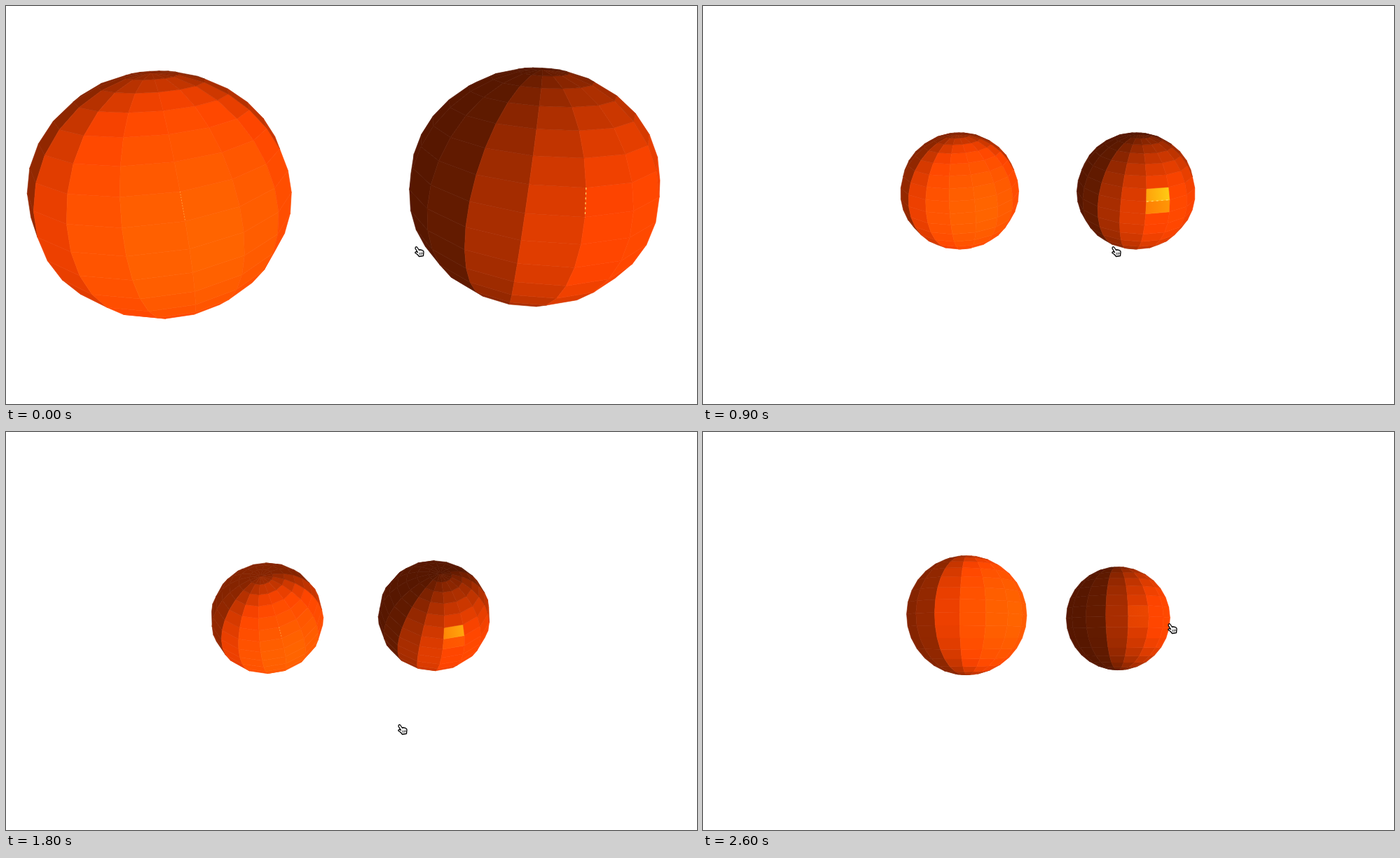
An HTML page with a canvas that plays this animation: 986 px wide and 568 px high, repeating every 2.8 s.

```html
<!DOCTYPE html>
<html lang="en">
<head>
<meta charset="utf-8">
<title>Two faceted spheres</title>
<style>
  html, body { margin: 0; width: 100%; height: 100%; overflow: hidden; background: #fff; }
  canvas { display: block; }
</style>
</head>
<body>
<canvas id="stage" width="986" height="568"></canvas>
<script>
const ctx = document.getElementById('stage').getContext('2d');
const LOOP = 2800, FOCAL = 700, CX = 492, CY = 264, SEG = 16;
const STEP = 360 / SEG, ROW = 180 / SEG;
const rad = deg => deg * Math.PI / 180;

// start ms, azimuth, pitch, distance, pointer x, pointer y
const poses = [
  [0, -3, 23, 4.15, 590, 351],
  [400, 0, 21, 4.14, 590, 351],
  [700, 0, 20.5, 4.36, 590, 351],
  [800, 0, 20.5, 6.5, 590, 351],
  [900, 0, 20.5, 8.45, 590, 351],
  [1000, 0, 20.5, 8.92, 590, 351],
  [1300, -14, 4, 8.92, 648, 306],
  [1400, -26, -13, 8.92, 703, 256],
  [1500, -23.7, -2.6, 8.92, 680, 291],
  [1600, -16, 14, 8.92, 641, 338],
  [1700, -8, 31, 8.92, 598, 388],
  [1800, -1.2, 45, 8.92, 566, 425],
  [1900, -1.2, 36, 8.92, 574, 394],
  [2000, -2, 12, 8.92, 596, 330],
  [2100, -4, -12, 8.92, 622, 262],
  [2200, -6.5, -31, 8.95, 641, 212],
  [2300, -19, -33, 8.92, 660, 196],
  [2400, -23, -10, 8.92, 678, 246],
  [2500, -25, -5, 8.92, 674, 268],
  [2600, -25.3, -2.5, 8.92, 670, 281]
];

const spheres = [
  { x: -1.5, ambient: .52, diffuse: .93, az: 24, lat: 0, shine: 1400, spread: 10 },
  { x: 1.5, ambient: .34, diffuse: .72, az: 27, lat: 3, shine: 600, spread: 22 }
];

function camera(azimuth, pitch, dist) {
  const a = rad(azimuth), p = rad(pitch);
  const sa = Math.sin(a), ca = Math.cos(a), sp = Math.sin(p), cp = Math.cos(p);
  return {
    pitch, x: dist * sa * cp, z: dist * ca * cp,
    project(x, y, z) {
      const scale = FOCAL / (dist - x * sa * cp - y * sp - z * ca * cp);
      return [
        CX + scale * (x * ca - z * sa),
        CY - scale * (y * cp - (x * sa + z * ca) * sp)
      ];
    }
  };
}

function shade(light, glow) {
  const r = light * 255 + glow, g = light * 69 + glow, b = glow * glow / 900;
  return `rgb(${[r, g, b].map(v => Math.min(255, Math.round(v)))})`;
}

const middle = (a, b) => [(a[0] + b[0]) / 2, (a[1] + b[1]) / 2];

function trace(points) {
  ctx.beginPath();
  points.forEach(p => ctx.lineTo(...p));
}

function seam(points, bold) {
  trace(points);
  ctx.strokeStyle = '#ffd96a';
  ctx.lineWidth = bold ? 1.2 : .8;
  ctx.setLineDash(bold ? [3, 4] : [1, 3]);
  ctx.stroke();
  ctx.setLineDash([]);
}

function drawSphere(s, cam) {
  const at = (lon, lat) => cam.project(
    s.x + Math.sin(rad(lon)) * Math.cos(rad(lat)),
    Math.sin(rad(lat)),
    Math.cos(rad(lon)) * Math.cos(rad(lat)));
  // direction halfway between viewer and light
  const facing = Math.atan2(cam.x - s.x, cam.z) * 180 / Math.PI;
  const halfLon = (facing + s.az) / 2, halfLat = (cam.pitch + s.lat) / 2;

  for (let lat = -90; lat < 90; lat += ROW) {
    for (let lon = -180; lon < 180; lon += STEP) {
      const quad = [at(lon, lat), at(lon + STEP, lat), at(lon + STEP, lat + ROW), at(lon, lat + ROW)];
      const [a, b, c, d] = quad;
      const area = (c[0] - a[0]) * (d[1] - b[1]) - (c[1] - a[1]) * (d[0] - b[0]);
      if (area >= 0) continue;

      const midLon = lon + STEP / 2, midLat = lat + ROW / 2;
      const facet = Math.cos(rad(midLat)) * Math.cos(rad(midLon - 30));
      const light = s.ambient + s.diffuse * Math.max(0, facet);
      const off = (midLon - halfLon) ** 2 + (midLat - halfLat) ** 2;
      const glow = s.shine * Math.exp(-off / s.spread);
      let fill = shade(light, 0);
      if (glow > 4) {
        fill = ctx.createLinearGradient(...middle(a, d), ...middle(b, c));
        fill.addColorStop(0, shade(light, glow * .8));
        fill.addColorStop(1, shade(light, glow * 1.15));
      }
      trace(quad);
      ctx.closePath();
      ctx.fillStyle = ctx.strokeStyle = fill;
      ctx.lineWidth = .6;
      ctx.fill();
      ctx.stroke();
    }
  }

  // sparkling cracks where the highlight meets a facet edge
  const lon = Math.round(halfLon / STEP) * STEP;
  const lat = Math.round(halfLat / ROW) * ROW;
  const right = s.x > 0;
  if (Math.abs(halfLon - lon) < 4.5 && lat > 0)
    seam([at(lon, lat + ROW), at(lon, lat)], right && cam.pitch > 22);
  if (right && lat > 0 && Math.abs(halfLat - lat) < 1.2)
    seam([at(0, lat), at(STEP, lat)], halfLon > 5);
}

const hand = new Path2D('M-6-5Q-6-8-3.5-7L-.5-2.5Q1-4 2-2.5Q3.5-3.5 4.3-1.8Q6-2 6 .5L5.5 5.5L-.5 6.5L-3 3.5L-6 1.5Q-6.5-.5-4-.2L-2.6 .6Z');
const creases = new Path2D('M-.2 1L.4 4.3M2 .7L2.4 4M4 .4L4.2 3.6');

function drawPointer(x, y) {
  ctx.save();
  ctx.translate(x, y);
  ctx.lineJoin = 'round';
  ctx.strokeStyle = '#000';
  ctx.fillStyle = '#fff';
  ctx.lineWidth = 1.3;
  ctx.fill(hand);
  ctx.stroke(hand);
  ctx.lineWidth = .8;
  ctx.stroke(creases);
  ctx.restore();
}

function draw(now) {
  const time = now % LOOP;
  const [, azimuth, pitch, dist, x, y] = poses.findLast(p => p[0] <= time);
  const cam = camera(azimuth, pitch, dist);
  ctx.fillStyle = '#fff';
  ctx.fillRect(0, 0, 986, 568);
  ctx.lineJoin = 'round';
  spheres.forEach(s => drawSphere(s, cam));
  drawPointer(x, y);
}

const start = performance.now();
function tick() {
  draw(performance.now() - start);
  requestAnimationFrame(tick);
}
tick();
</script>
</body>
</html>
```
